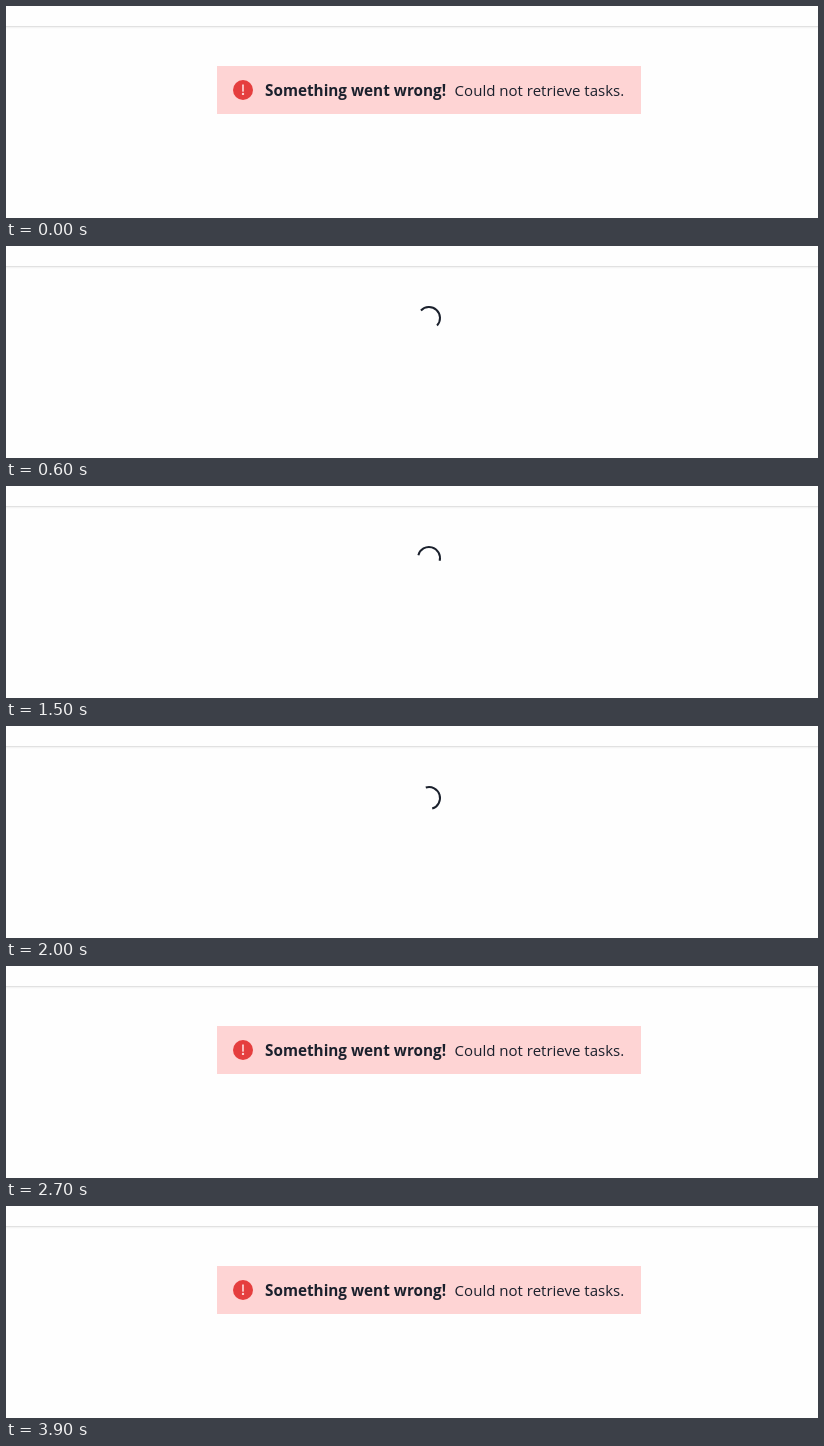
Animation of 812x212 px, one loop 4000 ms. Source, as an HTML page:

```html
<!DOCTYPE html>
<html lang="en">
<head>
<meta charset="utf-8">
<title>Task list</title>
<style>
  html, body { margin: 0; width: 100%; height: 100%; overflow: hidden; background: #fefefe; }
  svg { display: block; width: 812px; height: 212px; }
  text { font-family: "Open Sans", "Noto Sans", sans-serif; fill: #1a202c; }
  .title { font-size: 15.3px; font-weight: 700; }
  .detail { font-size: 15.04px; }
</style>
</head>
<body>
<svg viewBox="0 0 812 212">
  <rect width="812" height="212" fill="#fefefe"/>
  <g shape-rendering="crispEdges">
    <rect y="20" width="812" height="1" fill="#e1e1e1"/>
    <rect y="21" width="812" height="1" fill="#f4f4f4"/>
    <rect y="22" width="812" height="1" fill="#fbfbfb"/>
  </g>
  <g id="alert">
    <rect x="211" y="60" width="424" height="48" fill="#fed4d4"/>
    <circle cx="237" cy="84" r="10" fill="#e53e3e"/>
    <path d="M237 79.2V85" stroke="#fed4d4" stroke-width="1.7" stroke-linecap="round"/>
    <circle cx="237" cy="87.9" r="1.2" fill="#fed4d4"/>
    <text class="title" x="259" y="90">Something went wrong!</text>
    <text class="detail" x="448.6" y="90">Could not retrieve tasks.</text>
  </g>
  <path id="spinner" d="M-7.78 -7.78A11 11 0 0 1 7.78 7.78" fill="none" stroke="#1a202c" stroke-width="2"/>
</svg>
<script>
  const LOOP = 4000, STEP = 100;
  const LOAD_START = 600, LOAD_END = 2700;
  // [time in ms, rotation in degrees]
  const turns = [[600, -2], [1500, 690], [2000, 1108], [2600, 1588], [2700, 1668]];
  const alertBox = document.getElementById("alert");
  const spinner = document.getElementById("spinner");

  function angleAt(t) {
    const i = turns.findIndex(([end], k) => k > 0 && t <= end);
    const [t0, a0] = turns[i - 1], [t1, a1] = turns[i];
    return a0 + (a1 - a0) * (t - t0) / (t1 - t0);
  }

  function render(ms) {
    const t = Math.floor((ms % LOOP) / STEP) * STEP;
    const loading = t >= LOAD_START && t < LOAD_END;
    alertBox.style.display = loading ? "none" : "";
    spinner.style.display = loading ? "" : "none";
    if (loading) spinner.setAttribute("transform", `translate(423 72) rotate(${angleAt(t)})`);
  }

  const start = performance.now();
  function tick() {
    render(performance.now() - start);
    requestAnimationFrame(tick);
  }
  tick();
</script>
</body>
</html>
```
